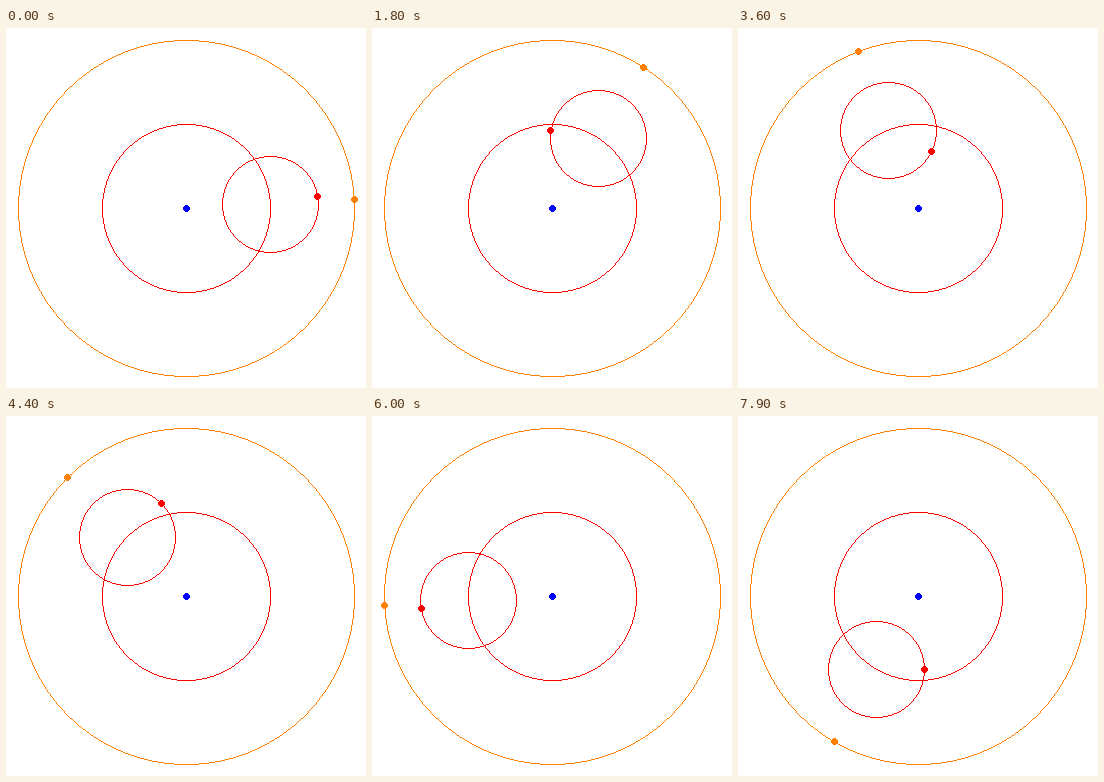
Animation, 360 px wide and 360 px high, one loop 8 s. Source, as an HTML page with a canvas:

```html
<!DOCTYPE html>
<html lang="en">
<head>
<meta charset="utf-8">
<title>Epicycle</title>
<style>
  html, body { margin: 0; width: 100%; height: 100%; overflow: hidden; background: #fff; }
  canvas { display: block; width: 360px; height: 360px; image-rendering: pixelated; }
</style>
</head>
<body>
<canvas id="stage" width="360" height="360"></canvas>
<script>
const ctx = document.getElementById('stage').getContext('2d');
const CENTER = { x: 180, y: 180 };
const OUTER = 168, DEFERENT = 84, EPICYCLE = 48;
const RED = '#ff0000', ORANGE = '#ff8000', BLUE = '#0000ff';
const STEP = 100, STEPS = 80;

// Point at an angle in degrees, counterclockwise around c
function orbit(c, r, deg) {
  const a = deg * Math.PI / 180;
  return { x: c.x + r * Math.cos(a), y: c.y - r * Math.sin(a) };
}

// One-pixel circle without smoothing
function ring(c, r, color) {
  const cx = Math.round(c.x), cy = Math.round(c.y);
  ctx.fillStyle = color;
  for (let u = 0; u <= r * Math.SQRT1_2 + 0.5; u++) {
    const v = Math.round(Math.sqrt(r * r - u * u));
    for (const [dx, dy] of [[u, v], [v, u]]) {
      for (const sx of [-1, 1]) {
        for (const sy of [-1, 1]) ctx.fillRect(cx + sx * dx, cy + sy * dy, 1, 1);
      }
    }
  }
}

// Seven-pixel disc
function dot(c, color) {
  const cx = Math.round(c.x), cy = Math.round(c.y);
  ctx.fillStyle = color;
  for (let dy = -3; dy <= 3; dy++) {
    const w = Math.floor(Math.sqrt(10 - dy * dy));
    ctx.fillRect(cx - w, cy + dy, 2 * w + 1, 1);
  }
}

function draw(n) {
  const hub = orbit(CENTER, DEFERENT, 3 * n);
  ctx.fillStyle = '#fff';
  ctx.fillRect(0, 0, 360, 360);
  ring(CENTER, OUTER, ORANGE);
  ring(CENTER, DEFERENT, RED);
  ring(hub, EPICYCLE, RED);
  dot(CENTER, BLUE);
  dot(orbit(CENTER, OUTER, 3 * n), ORANGE);
  dot(orbit(hub, EPICYCLE, 9 * n), RED);
}

function tick() {
  draw(Math.floor(performance.now() / STEP) % STEPS + 1);
  requestAnimationFrame(tick);
}
tick();
</script>
</body>
</html>
```
